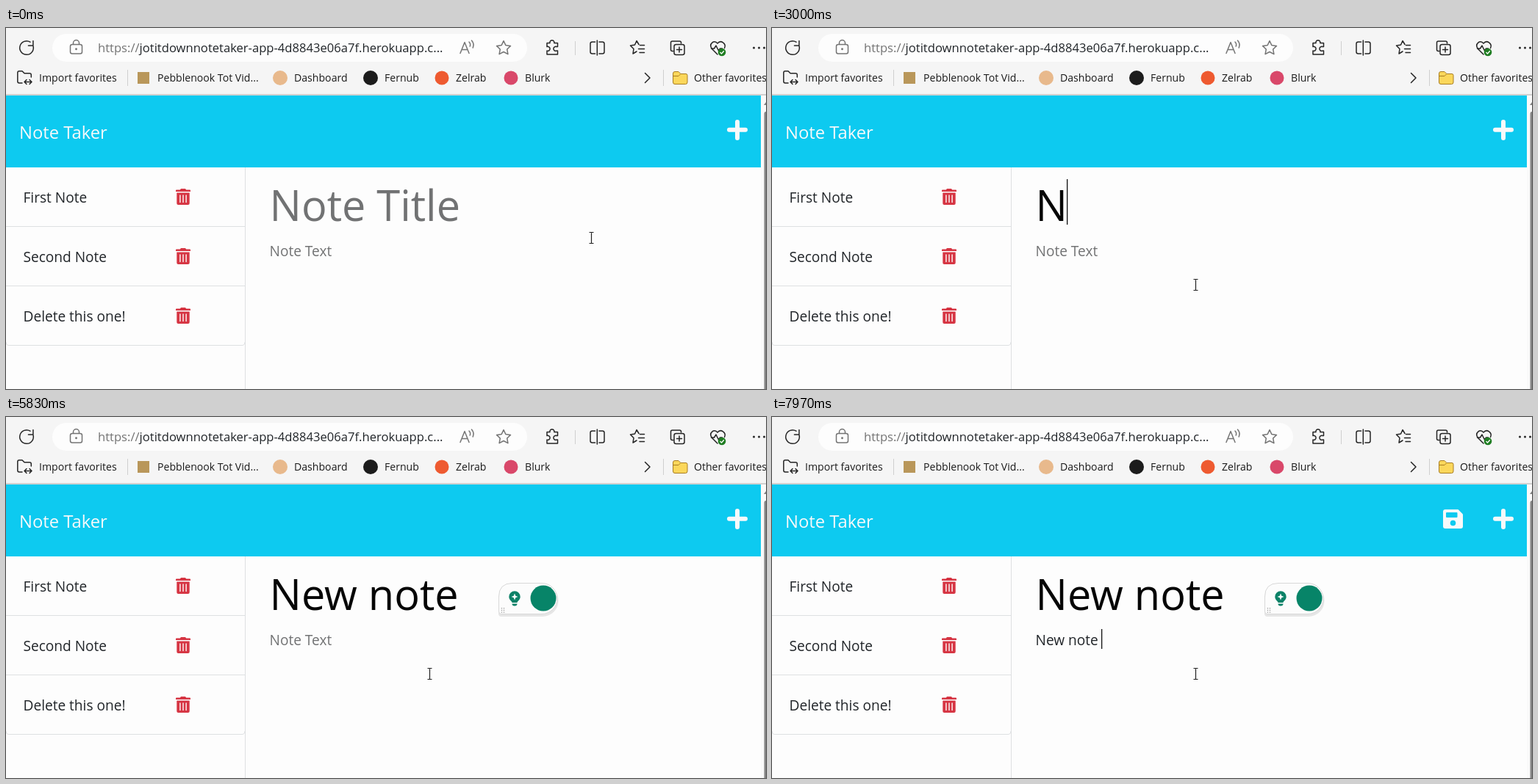
Animation, 1034 px wide and 492 px high, one loop 8 s. Source, as an HTML page:

```html
<!DOCTYPE html>
<html lang="en">
<head>
<meta charset="utf-8">
<title>Note Taker</title>
<style>
  html, body { margin: 0; width: 100%; height: 100%; overflow: hidden; background: #fdfdfd; }
  svg { display: block; width: 1034px; height: 492px; }
  text { font-family: "Open Sans", "Noto Sans", sans-serif; white-space: pre; fill: #212529; }
  .mark { font-size: 14.1px; fill: #1b1b1b; }
  .note { font-size: 19.1px; }
  .line { fill: none; stroke: #252525; stroke-width: 1.5; stroke-linecap: round; stroke-linejoin: round; }
  .dim { stroke: #747474; }
  .rule { fill: none; stroke: #dee0e2; }
</style>
</head>
<body>
<svg viewBox="0 0 1034 492">
  <defs>
    <path id="star" d="M0-9.5 2.9-3.4 9.5-2.6 4.7 2 5.9 8.7 0 5.5-5.9 8.7-4.7 2-9.5-2.6-2.9-3.4Z"/>
    <g id="trash">
      <path d="M7 0h6l1.2 1.6H19q1 0 1 1V4H0V2.6q0-1 1-1h4.8Z" fill="#d63543"/>
      <path d="M1.3 5.5h17.4V20q0 2-2 2H3.3q-2 0-2-2Z" fill="#d63543"/>
      <path d="M5.9 9v9.5M10 9v9.5M14.1 9v9.5" stroke="#fbeeee" stroke-width="1.5" stroke-linecap="round"/>
    </g>
  </defs>

  <!-- Browser toolbar -->
  <rect width="1034" height="91" fill="#f5f5f5"/>
  <rect x="63" y="8" width="646" height="38" rx="19" fill="#fdfdfd"/>
  <g class="line">
    <path d="M36.8 24A9.3 9.3 0 1 1 33 19.2M36.9 17.5v6.5h-6.5"/>
    <g class="dim">
      <rect x="87.5" y="22.5" width="16" height="12.5" rx="2.5"/>
      <path d="M91.5 22v-1.5a4 4 0 0 1 8 0V22"/>
      <circle cx="95.5" cy="28.7" r=".7"/>
      <path d="M618 34.5 624 19.5 630 34.5M620 29.5h8M630 19q2.600 2.500 1.200 6M633.500 17q4 4.500 1.700 10"/>
      <use href="#star" x="677" y="27"/>
    </g>
    <path d="M736 20.5h4a3 3 0 1 1 5.800 0h4.700v5h-1.500a3 3 0 1 0 0 5.600h1.500v5h-14.500v-5a3 3 0 1 0 0-5.600Z"/>
    <path d="M801.5 19h-4q-2.500 0-2.500 2.500v11q0 2.500 2.500 2.500h4M807 19h4.500q2.500 0 2.500 2.500v11q0 2.500-2.500 2.500H807M804.300 17v20"/>
    <path d="M861 22.5 858 17.5 855.5 23 849.5 24 854 28.5 853 35 858 32M862.5 23.5h6M860.5 28.5h8M862 33.5h6.500"/>
    <path d="M908 31.5h-1.500q-2 0-2-2v-9.500q0-2 2-2h10q2 0 2 2v1"/>
    <rect x="909" y="22.5" width="14" height="14" rx="2.5"/>
    <path d="M916 26v7M912.5 29.5h7"/>
    <path d="M968 36 960.5 28.5c-5-7 3-13 7.500-7.500 4.500-5.500 12.500.5 9.500 6.500M959.5 28h4l2.500-4 3.500 7 2-3h3"/>
  </g>
  <circle cx="974" cy="33" r="5.3" fill="#1f7d22"/>
  <path d="m971.5 33 2 2 3.300-3.800" fill="none" stroke="#fff" stroke-width="1.3"/>
  <path d="M774.5 18v19M165.500 57v22M894.5 57v22" stroke="#cfcfcf"/>
  <g fill="#252525"><circle cx="1017.5" cy="27" r="1.5"/><circle cx="1024.5" cy="27" r="1.5"/><circle cx="1031.5" cy="27" r="1.5"/></g>
  <text x="125" y="33" font-size="16.6"><tspan fill="#747474">https://</tspan>jotitdownnotetaker-app-4d8843e06a7f.herokuapp.c...</text>

  <!-- Bookmarks -->
  <g class="line">
    <path d="M22 75h-4q-2.200 0-2.200-2.200V61q0-2.200 2.200-2.200h4l3 3h7q2.300 0 2.300 2.200v3M25 73.5h10M28 70.5l-3 3 3 3M32 70.5l3 3-3 3"/>
    <path d="m869.5 61.500 6.500 6.500-6.500 6.500"/>
  </g>
  <rect x="179" y="60" width="16" height="16" fill="#b9975a"/>
  <circle cx="373" cy="68" r="10" fill="#e8b98c"/>
  <circle cx="496" cy="68" r="10" fill="#1c1c1c"/>
  <circle cx="593" cy="68" r="9.5" fill="#ee5a30"/>
  <circle cx="687" cy="68" r="9.5" fill="#d9486a"/>
  <path d="M907.5 62q0-2.500 2.500-2.500h5l3 3h7q2 0 2 2V74q0 2.500-2.500 2.500H910q-2.500 0-2.500-2.500Z" fill="#fbd75b" stroke="#a87d22"/>
  <path d="M908 65.5h7l3-3" fill="none" stroke="#a87d22"/>
  <text class="mark" x="45" y="73">Import favorites</text>
  <text class="mark" x="206" y="73">Pebblenook Tot Vid...</text>
  <text class="mark" x="392" y="73">Dashboard</text>
  <text class="mark" x="515" y="73">Fernub</text>
  <text class="mark" x="612" y="73">Zelrab</text>
  <text class="mark" x="706" y="73">Blurk</text>
  <text class="mark" x="936" y="73">Other favorites</text>
  <path d="M0 91h1034" stroke="#c4c4c4" stroke-width="1.5"/>

  <!-- Page -->
  <rect y="92" width="1027" height="98" fill="#0dcaf0"/>
  <rect x="1027" y="92" width="7" height="400" fill="#fafafa"/>
  <path d="m1031 105 3-4v4Z" fill="#808080"/>
  <path d="M1034 114q-2.500 0-2.500 3v375h2.500Z" fill="#858585"/>
  <text x="18" y="151" font-size="23.8" style="fill:#f8f9fa">Note Taker</text>
  <path d="M995 128v22M984 138.700h22" stroke="#f8f9fa" stroke-width="6" stroke-linecap="round"/>
  <g id="save">
    <path d="M916 126h17.500l6.500 6.500V149q0 3-3 3h-21q-3 0-3-3v-20q0-3 3-3Z" fill="#f8f9fa"/>
    <rect x="917" y="130" width="15.5" height="7" rx="1" fill="#0dcaf0"/>
    <circle cx="926.5" cy="144.5" r="3.8" fill="#0dcaf0"/>
  </g>
  <path class="rule" d="M325.5 190v302M0 270.5h325M0 351.5h325M0 428q0 4.500 4 4.500h317q4 0 4-4.500"/>
  <text class="note" x="23.5" y="238">First Note</text>
  <text class="note" x="23.5" y="319">Second Note</text>
  <text class="note" x="23.5" y="400">Delete this one!</text>
  <use href="#trash" x="231" y="219"/>
  <use href="#trash" x="231" y="300"/>
  <use href="#trash" x="231" y="381"/>

  <text id="title" x="358.5" y="263" font-size="57.6"></text>
  <text id="body" class="note" x="358.5" y="311"></text>
  <rect id="caret" width="1.3" fill="#111"/>

  <g id="helper">
    <path d="M688 229h42a21.500 21.500 0 0 1 0 43h-56q-4 0-4-4v-21q0-18 18-18Z" fill="#d8d8d8" opacity=".6"/>
    <path d="M689 226.5h40a21 21 0 0 1 0 42h-55q-3.500 0-3.500-3.500v-20q0-18.500 18.500-18.500Z" fill="#fcfcfc" stroke="#d8d8d8"/>
    <path d="M688.5 253c0-2-4.200-3.500-4.200-8a7.700 7.700 0 0 1 15.400 0c0 4.500-4.200 6-4.200 8ZM688.5 254.500h7q0 3-3.500 3t-3.500-3Z" fill="#0c8268"/>
    <path d="m692 240.5 1.300 3.200 3.200 1.300-3.200 1.300-1.300 3.200-1.300-3.200-3.200-1.300 3.200-1.300Z" fill="#fff"/>
    <circle cx="731" cy="247" r="17.5" fill="#078468"/>
    <path d="M674.5 260v7M677.5 260v7" stroke="#959595" stroke-width="1.2" stroke-dasharray="1.2 1.6"/>
  </g>
  <path id="pointer" d="M-3-7.500h2.500L0-7 .5-7.500H3M0-7V7M-3 7.500h2.500L0 7 .5 7.500H3" fill="none" stroke="#222" stroke-width="1.2"/>
</svg>
<script>
const LOOP = 8000, BLINK = 530, CLICK = 1700, BODY_FOCUS = 5300;
const el = id => document.getElementById(id);

// Pointer stops: time, x, y
const path = [[0, 796, 286], [60, 796, 286], [700, 579, 358], [950, 579, 358],
              [1650, 452, 265], [2250, 452, 265], [2800, 576, 350], [LOOP, 576, 350]];

const title = { el: el('title'), hint: 'Note Title', color: '#050505', text: 'New note',
  keys: [2900, 3150, 3400, 3850, 3970, 4090, 4210, 4330], top: 206, height: 62 };
const body = { el: el('body'), hint: 'Note Text', color: '#212529', text: 'New note ',
  keys: [6100, 6300, 6500, 6700, 7100, 7250, 7400, 7550, 7750], top: 289, height: 27 };

const show = (id, on) => el(id).setAttribute('visibility', on ? 'visible' : 'hidden');

function type(field, t) {
  const count = field.keys.filter(k => k <= t).length;
  field.el.textContent = count ? field.text.slice(0, count) : field.hint;
  field.el.style.fill = count ? field.color : '#717273';
  return count;
}

function placePointer(t) {
  const i = path.findIndex(p => p[0] > t);
  const [t0, x0, y0] = path[i - 1], [t1, x1, y1] = path[i];
  const u = (t - t0) / (t1 - t0), e = u * u * (3 - 2 * u);
  const x = Math.round(x0 + (x1 - x0) * e), y = Math.round(y0 + (y1 - y0) * e);
  el('pointer').setAttribute('transform', `translate(${x + .5} ${y})`);
}

function placeCaret(t, counts) {
  const inBody = t >= BODY_FOCUS;
  const field = inBody ? body : title;
  const count = counts[+inBody];
  const since = count ? field.keys[count - 1] : inBody ? BODY_FOCUS : CLICK;
  show('caret', t >= CLICK && Math.floor((t - since) / BLINK) % 2 === 0);
  const caret = el('caret');
  caret.setAttribute('x', 359 + (count ? Math.round(field.el.getComputedTextLength() - 1) : 0));
  caret.setAttribute('y', field.top);
  caret.setAttribute('height', field.height);
}

function draw() {
  const t = performance.now() % LOOP;
  const counts = [type(title, t), type(body, t)];
  placePointer(t);
  placeCaret(t, counts);
  show('save', counts[1] > 0);
  show('helper', t >= BODY_FOCUS + 250);
  requestAnimationFrame(draw);
}
draw();
</script>
</body>
</html>
```
